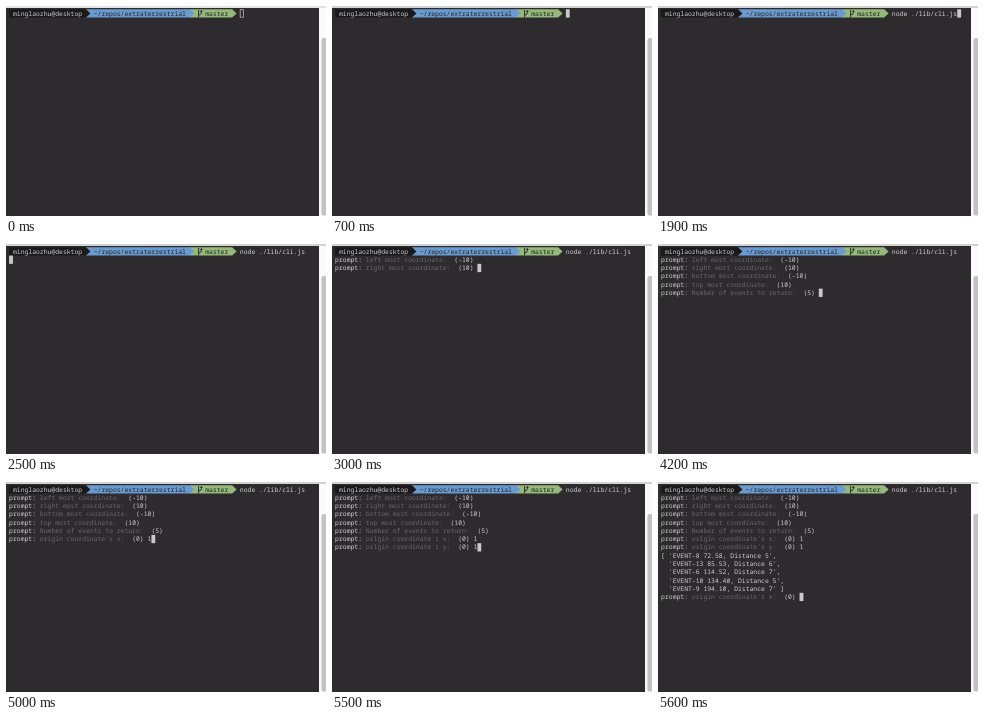
Write an HTML page that moves like this. It is 320 px wide and 210 px high and loops after 6300 ms.

```html
<!DOCTYPE html>
<html lang="en">
<head>
<meta charset="utf-8">
<title>Terminal session</title>
<style>
html, body { margin: 0; width: 100%; height: 100%; overflow: hidden; background: #2e2b2f; }
svg { display: block; width: 320px; height: 210px; }
text {
  font: 6.41px "Noto Sans Mono", "DejaVu Sans Mono", monospace;
  white-space: pre;
  text-rendering: geometricPrecision;
}
</style>
</head>
<body>
<svg id="stage" viewBox="0 0 320 210" xmlns="http://www.w3.org/2000/svg"></svg>
<script>
const LOOP = 6300, COL = 3.846, ROW = 8.27, LEFT = 3.1, TOP = 3.3;
const LIGHT = '#cfcfcf', DIM = '#69686b', DARK = '#202124';
const BLACK = '#1a1a1c', BLUE = '#6a9bd0', GREEN = '#94b97a';
const stage = document.getElementById('stage');
const timed = [];
const colX = c => LEFT + c * COL;
const rowY = r => TOP + r * ROW;

function add(tag, attrs, from = 0, to = LOOP) {
  const el = document.createElementNS('http://www.w3.org/2000/svg', tag);
  for (const k in attrs) el.setAttribute(k, attrs[k]);
  stage.append(el);
  if (from > 0 || to < LOOP) timed.push({ el, from, to });
  return el;
}

function rect(x, y, width, height, fill, from, to) {
  return add('rect', { x, y, width, height, fill }, from, to);
}

function type(row, col, str, fill = LIGHT, from, to) {
  add('text', { x: colX(col), y: rowY(row) + 6.3, fill }, from, to).textContent = str;
}

function segment(c0, c1, fill) {
  const x0 = colX(c0), x1 = colX(c1), y = rowY(0);
  add('path', { fill, d: `M${x0} ${y}H${x1}l${COL + 0.6} ${ROW / 2}L${x1} ${y + ROW}H${x0}Z` });
}

// window
rect(0, 0, 320, 210, '#2e2b2f');
rect(313, 0, 7, 210, '#fafafa');
rect(315.4, 32, 6, 177.5, '#c2c2c2').setAttribute('rx', 2.5);
rect(0, 0, 320, 2, '#e4e4e4', 0, 700);
rect(0, 0, 320, 2, '#d2d2d2', 700);

// shell prompt, drawn right to left so each arrow overlaps the next segment
segment(47, 58, GREEN);
segment(20, 47, BLUE);
segment(0, 20, BLACK);
type(0, 1, 'minglaozhu@desktop');
type(0, 22, '~/repos/extraterrestrial', DARK);
add('path', {
  d: 'M192.6 4v7.4M192.6 9Q195.4 8.6 195.4 6.8V4.8M194.4 5.9l1-1.3l1 1.3',
  fill: 'none', stroke: DARK, 'stroke-width': 0.9
});
type(0, 51, 'master', DARK);
type(0, 60, 'node ./lib/cli.js', LIGHT, 1900);

// questions: time, row, label, default
const asks = [
  [2600, 1, 'left most coordinate:', '(-10)'],
  [3000, 2, 'right most coordinate:', '(10)'],
  [3300, 3, 'bottom most coordinate:', '(-10)'],
  [3700, 4, 'top most coordinate:', '(10)'],
  [4200, 5, 'Number of events to return:', '(5)'],
  [4600, 6, "origin coordinate's x:", '(0)'],
  [5200, 7, "origin coordinate's y:", '(0)'],
  [5600, 13, "origin coordinate's x:", '(0)']
];
for (const [at, row, label, preset] of asks) {
  type(row, 0, 'prompt:', LIGHT, at);
  type(row, 8, label, DIM, at);
  type(row, 10 + label.length, preset, LIGHT, at);
}
type(6, 36, '1', LIGHT, 5000);
type(7, 36, '1', LIGHT, 5500);

[
  "[ 'EVENT-8 72.58, Distance 5',",
  "  'EVENT-13 85.53, Distance 6',",
  "  'EVENT-6 114.52, Distance 7',",
  "  'EVENT-10 134.40, Distance 5',",
  "  'EVENT-9 194.10, Distance 7' ]"
].forEach((line, i) => type(8 + i, 0, line, LIGHT, 5600));

// cursor: hollow until the window has focus, then time, row, column
add('rect', {
  x: colX(60) + 0.3, y: rowY(0) + 0.4, width: COL - 0.6, height: ROW - 0.8,
  fill: 'none', stroke: '#c4c4c4', 'stroke-width': 0.7
}, 0, 700);
const cursor = [
  [700, 0, 60], [1900, 0, 77], [2300, 1, 0],
  ...asks.map(([at, row, label, preset]) => [at, row, 11 + label.length + preset.length]),
  [5000, 6, 37], [5500, 7, 37]
].sort((a, b) => a[0] - b[0]);
cursor.forEach(([at, row, col], i) => {
  const end = i + 1 < cursor.length ? cursor[i + 1][0] : LOOP;
  rect(colX(col), rowY(row), COL, ROW, '#c9c9c9', at, end);
});

function draw(now) {
  const t = now % LOOP;
  for (const { el, from, to } of timed) {
    el.style.visibility = t >= from && t < to ? 'visible' : 'hidden';
  }
}

let start;
function tick(now) {
  start ??= now;
  draw(Math.max(0, now - start));
  requestAnimationFrame(tick);
}
draw(0);
requestAnimationFrame(tick);
</script>
</body>
</html>
```
